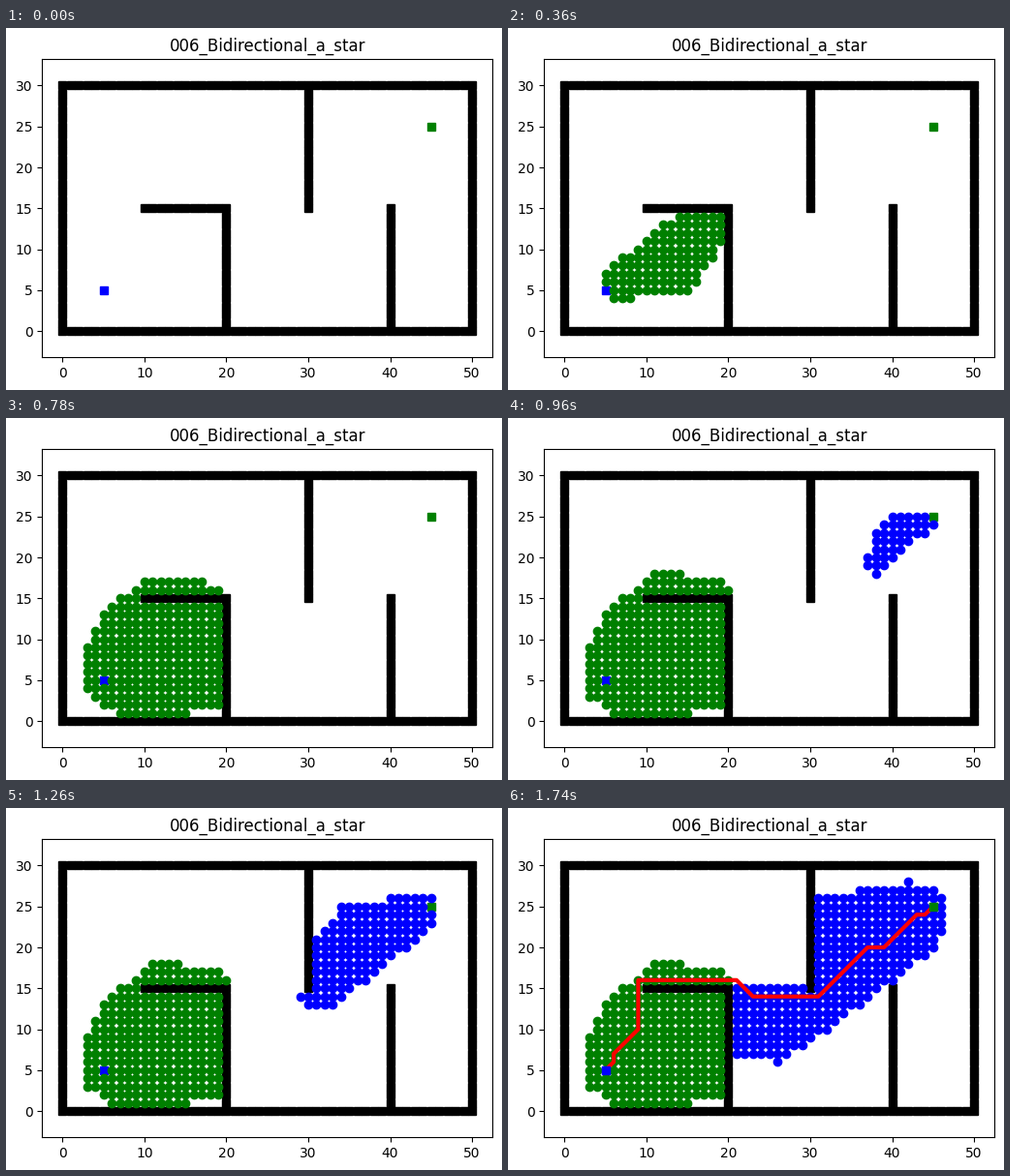
A matplotlib script that plays this animation: 512 px wide and 374 px high, repeating every 1800 ms.

```python
import math
from itertools import product

import numpy as np
import matplotlib.pyplot as plt
from matplotlib.animation import FuncAnimation

W, H, DPI = 512, 374, 100
FRAMES, INTERVAL = 30, 60
START, GOAL = (5, 5), (45, 25)

WALLS = {(x, y) for x in range(51) for y in (0, 30)}
WALLS |= {(x, y) for x in (0, 50) for y in range(31)}
WALLS |= {(x, 15) for x in range(10, 21)}
WALLS |= {(20, y) for y in range(15)}
WALLS |= {(30, y) for y in range(15, 30)}
WALLS |= {(40, y) for y in range(16)}

MOVES = [m for m in product((-1, 0, 1), repeat=2) if m != (0, 0)]
PATH = [(5, 5), (6, 6), (6, 7), (9, 10), (9, 16), (21, 16), (23, 14),
        (31, 14), (37, 20), (39, 20), (43, 24), (44, 24), (45, 25)]


def neighbors(x, y):
    """Free neighbours; diagonals may not cut wall corners."""
    for dx, dy in MOVES:
        if not WALLS & {(x + dx, y + dy), (x + dx, y), (x, y + dy)}:
            yield (x + dx, y + dy), math.hypot(dx, dy)


def expand(root, target, count):
    """First `count` cells closed by A* after the root, in order."""
    cost = {root: 0.0}
    frontier = [(math.dist(root, target), root)]
    closed, order = set(), []
    while len(order) <= count:
        item = min(frontier)
        frontier.remove(item)
        cell = item[1]
        if cell in closed:
            continue
        closed.add(cell)
        order.append(cell)
        for nxt, step in neighbors(*cell):
            new = cost[cell] + step
            if new < cost.get(nxt, math.inf) - 1e-9:
                cost[nxt] = new
                frontier.append((new + math.dist(nxt, target), nxt))
    return np.array(order[1:])


fore = expand(START, GOAL, 248)
back = expand(GOAL, START, 283)

fig = plt.figure(figsize=(W / DPI, H / DPI), dpi=DPI, facecolor="white")
ax = fig.add_axes([37.22 / W, 33.72 / H, 465 / W, 308 / H])
ax.set_title("006_Bidirectional_a_star")

ax.plot(*zip(*WALLS), "sk")
ax.plot(*START, "bs")
ax.plot(*GOAL, "gs")
fore_dots, = ax.plot([], [], "go")
back_dots, = ax.plot([], [], "bo")
finish = [ax.plot(*zip(*PATH), "r", linewidth=3)[0],
          ax.plot(*START, "bs")[0],
          ax.plot(*GOAL, "gs")[0]]

half = 55 * 308 / 465 / 2
ax.set_xlim(-2.5, 52.5)
ax.set_ylim(15 - half, 15 + half)


def update(i):
    n = round(np.interp(i, [0, 6, 13, 14], [0, 104, 239, 248]))
    m = round(np.interp(i, [14, 18, 21, 25, 28], [0, 73, 129, 217, 283]))
    fore_dots.set_data(fore[:n, 0], fore[:n, 1])
    back_dots.set_data(back[:m, 0], back[:m, 1])
    for art in finish:
        art.set_visible(i == FRAMES - 1)
    return [fore_dots, back_dots, *finish]


anim = FuncAnimation(fig, update, frames=FRAMES, interval=INTERVAL,
                     init_func=lambda: update(0), repeat=True,
                     repeat_delay=0, blit=False)
plt.show()
```
